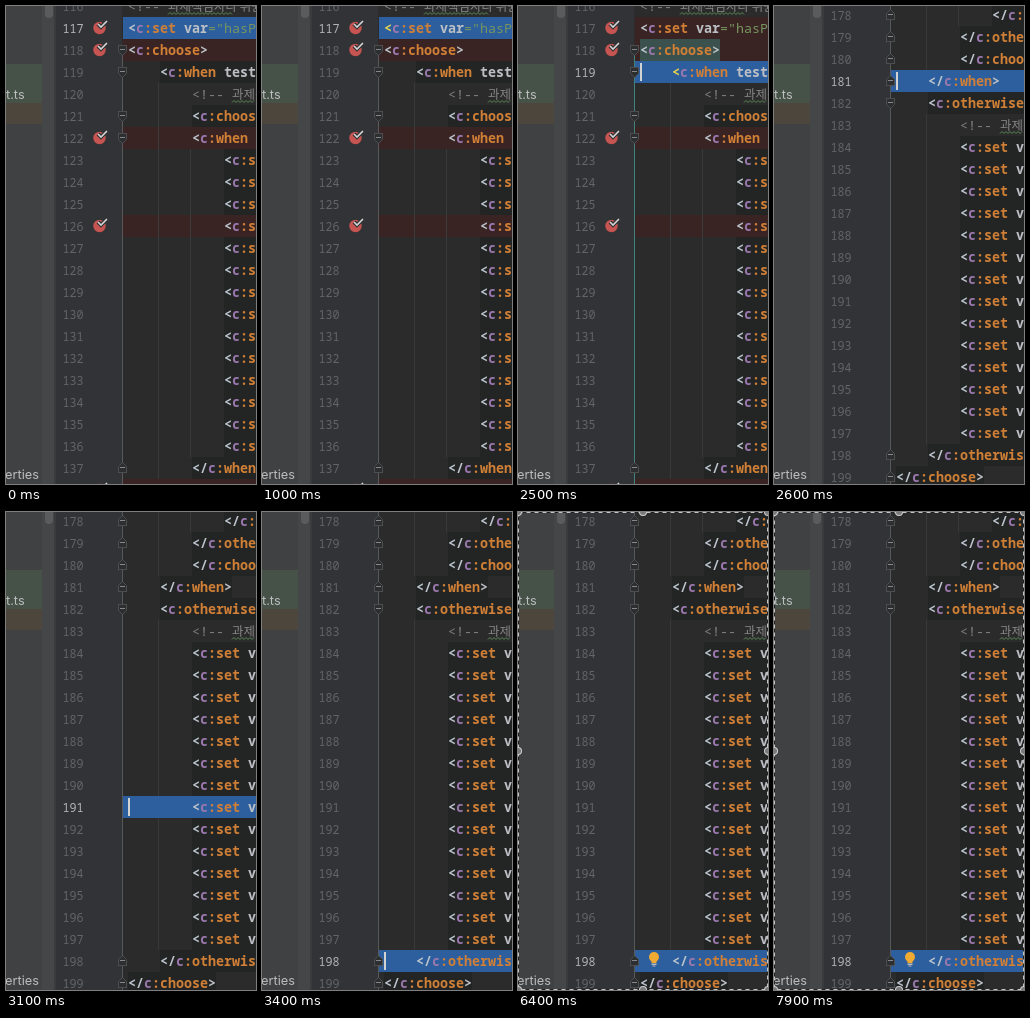
Animation of 250x478 px, one loop 8000 ms. Source, as an HTML page with a canvas:

```html
<!DOCTYPE html>
<html lang="en">
<head>
<meta charset="utf-8">
<style>
  html, body { margin: 0; width: 100%; height: 100%; overflow: hidden; background: #2b2b2b; }
  canvas { display: block; }
</style>
</head>
<body>
<canvas id="stage" width="250" height="478"></canvas>
<script>
const ctx = document.getElementById('stage').getContext('2d');
const LOOP = 8000, W = 250, H = 478, ROW = 22, CHAR = 8, TEXT_X = 122;
const MONO = '"Noto Sans Mono", "DejaVu Sans Mono", monospace';
const KOREAN = '"Noto Sans CJK KR", "Noto Sans CJK", sans-serif';

// Each line: [indent level, text]
const lines = {
  116: [0, '<!-- 과제책임자나 위원'],
  117: [0, '<c:set var="hasP'],
  118: [0, '<c:choose>'],
  119: [1, '<c:when test="'],
  120: [2, '<!-- 과제책임자'],
  121: [2, '<c:choose>'],
  122: [2, '<c:when test="'],
  137: [2, '</c:when>'],
  178: [3, '</c:otherwise>'],
  179: [2, '</c:otherwise>'],
  180: [2, '</c:choose>'],
  181: [1, '</c:when>'],
  182: [1, '<c:otherwise>'],
  183: [2, '<!-- 과제책임자'],
  198: [1, '</c:otherwise>'],
  199: [0, '</c:choose>'],
};
for (let n = 123; n <= 136; n++) lines[n] = [3, '<c:set var="'];
for (let n = 184; n <= 197; n++) lines[n] = [2, '<c:set var="'];

const breakpoints = [117, 118, 122, 126, 138];
const foldStarts = [118, 119, 121, 122, 182];
const foldEnds = [137, 178, 179, 180, 181, 198, 199];

const mod = (a, b) => ((a % b) + b) % b;

function rect(x, y, w, h, color) {
  ctx.fillStyle = color;
  ctx.fillRect(x, y, w, h);
}

function path(points, color, width = 1, close = false) {
  ctx.beginPath();
  points.forEach(([x, y]) => ctx.lineTo(x, y));
  if (close) ctx.closePath();
  ctx.strokeStyle = color;
  ctx.lineWidth = width;
  ctx.stroke();
}

function circle(x, y, r, color) {
  ctx.beginPath();
  ctx.arc(x, y, r, 0, Math.PI * 2);
  ctx.fillStyle = color;
  ctx.fill();
}

function text(str, x, y, color, font) {
  ctx.font = font;
  ctx.fillStyle = color;
  ctx.fillText(str, x, y);
}

function caretLine(t) {
  if (t < 2300) return 117;
  if (t < 2400) return 118;
  if (t < 2600) return 119;
  if (t < 2800) return 181;
  return Math.min(198, 181 + Math.round((t - 2700) / 700 * 17));
}

function caretVisible(t) {
  if (t < 2200) return mod(t - 45, 502) < 251;
  if (t < 3800) return true;
  return mod(t - 4590, 504) < 252;
}

function drawComment(str, x, y) {
  const words = str.slice(5), start = x + 5 * CHAR;
  text('<!--', x, y + 4.5, '#808080', `13.33px ${MONO}`);
  text(words, start, y + 4.5, '#858585', `12.5px ${KOREAN}`);
  const wave = [];
  for (let i = 0; start + i * 2 < Math.min(W, start + 66); i++) {
    wave.push([start + i * 2, y + (i % 2 ? 6.5 : 8.5)]);
  }
  path(wave, '#5a8a57');
}

function drawCode(str, x, y, matched) {
  const [, open, prefix, name, rest] = str.match(/^(<\/?)(c)(:\w+)(.*)$/);
  const equals = rest.indexOf('=');
  const attr = equals < 0 ? rest : rest.slice(0, equals);
  const value = equals < 0 ? '' : rest.slice(equals);
  const parts = [
    [open, matched ? '#e8d44d' : '#bcc4cd', 600],
    [prefix, '#9b78ad', 700],
    [name, '#d07f36', 700],
    [attr, '#bcc0c5', 600],
    [value, '#76955f', 500],
  ];
  for (const [part, color, weight] of parts) {
    text(part, x, y + 4.5, color, `${weight} 13.33px ${MONO}`);
    x += part.length * CHAR;
  }
}

function drawFold(y, dir) {
  const points = [[112.5, y - 4.5 * dir], [120.5, y - 4.5 * dir], [120.5, y + 1.5 * dir],
                  [116.5, y + 5.5 * dir], [112.5, y + 1.5 * dir]];
  path(points, '#6b6d6f', 1, true);
  ctx.fillStyle = '#2d2e2f';
  ctx.fill();
  path([[114, y - 0.5], [119, y - 0.5]], '#85878a');
}

function drawBreakpoint(y) {
  circle(93.5, y, 6.2, '#c75450');
  const check = [[92, y - 4], [95, y - 1], [101, y - 7]];
  path(check, '#313335', 4);
  path(check, '#d5d5d5', 1.6);
}

function drawSidebar() {
  const font = '12.8px Inter, "Open Sans", sans-serif';
  rect(0, 0, 36, H, '#3f4142');
  rect(0, 58, 36, 39, '#465247');
  rect(0, 97, 36, 21, '#4d463d');
  rect(36, 0, 14, H, '#444647');
  rect(48, 0, 2, H, '#393b3d');
  ctx.beginPath();
  ctx.roundRect(39, -8, 8, 20, 4);
  ctx.fillStyle = '#595b5c';
  ctx.fill();
  text('t.ts', 0, 93, '#bbbdbf', font);
  text('erties', -1, 473, '#bbbdbf', font);
}

function drawBulb(y) {
  circle(136, y - 4, 5, '#f2ab32');
  rect(133.5, y - 1, 5, 3, '#f2ab32');
  rect(133.5, y + 2.5, 5, 1.5, '#b8b8b8');
  rect(134.5, y + 4.5, 3, 1, '#b8b8b8');
}

function drawMarquee() {
  const box = [[0.5, 0.5], [W - 0.5, 0.5], [W - 0.5, H - 0.5], [0.5, H - 0.5]];
  path(box, '#222', 1, true);
  ctx.setLineDash([4, 4]);
  path(box, '#c4c4c4', 1, true);
  ctx.setLineDash([]);
  for (const x of [0, W / 2, W]) {
    for (const y of [0, H / 2, H]) {
      if (x === W / 2 && y === H / 2) continue;
      circle(x, y, 4, '#d0d0d0');
      circle(x, y, 3, '#77797b');
    }
  }
}

function drawEditor(t) {
  const current = caretLine(t);
  const scrolled = t >= 2600;
  const first = scrolled ? 178 : 116, last = scrolled ? 199 : 138;
  const center = n => scrolled ? 75 + (n - 181) * ROW : 22 + (n - 117) * ROW;
  const matching = current === 119;

  rect(50, 0, 66, H, '#313336');
  rect(116, 0, W - 116, H, '#2b2b2b');

  for (let n = first; n <= last; n++) {
    const y = center(n), top = y - ROW / 2;
    const [indent, str] = lines[n] || [0, ''];
    const x = TEXT_X + indent * 4 * CHAR;
    if (n === current) rect(117, top, W, ROW, '#2d5f9f');
    else if (breakpoints.includes(n)) rect(117, top, W, ROW, '#3a2323');
    else if (str.includes('c:')) {
      rect(x, top, str.includes('=') ? W : str.length * CHAR, ROW, '#232525');
    }
    if (matching && n === 118) rect(x, top, str.length * CHAR, ROW, '#3b514d');
    if (n !== current) {
      for (let i = 1; i < indent; i++) {
        rect(TEXT_X + i * 4 * CHAR - 2, top, 1, ROW, '#393b3b');
      }
    }
  }

  const foldTop = scrolled ? 0 : center(118);
  rect(116, foldTop, 1, H, matching ? '#43817c' : '#57595b');

  for (let n = first; n <= last; n++) {
    const y = center(n);
    text(n, 56.5, y + 4.5, n === current ? '#b4b5b6' : '#626568', `11.7px ${MONO}`);
    if (breakpoints.includes(n)) drawBreakpoint(y);
    if (foldStarts.includes(n)) drawFold(y, 1);
    if (foldEnds.includes(n)) drawFold(y, -1);
    if (!lines[n]) continue;
    const [indent, str] = lines[n];
    const x = TEXT_X + indent * 4 * CHAR;
    if (str.startsWith('<!--')) drawComment(str, x, y);
    else drawCode(str, x, y, n === current && t >= 100 && n < 120);
  }

  const y = center(current);
  if (t >= 3800) drawBulb(y);
  if (caretVisible(t)) rect(122, y - 9, 2, 18, '#d0d2d4');
}

function frame(now) {
  const t = Math.floor((now % LOOP) / 100) * 100;
  drawEditor(t);
  drawSidebar();
  if (t >= 6400) drawMarquee();
  requestAnimationFrame(frame);
}
requestAnimationFrame(frame);
</script>
</body>
</html>
```
